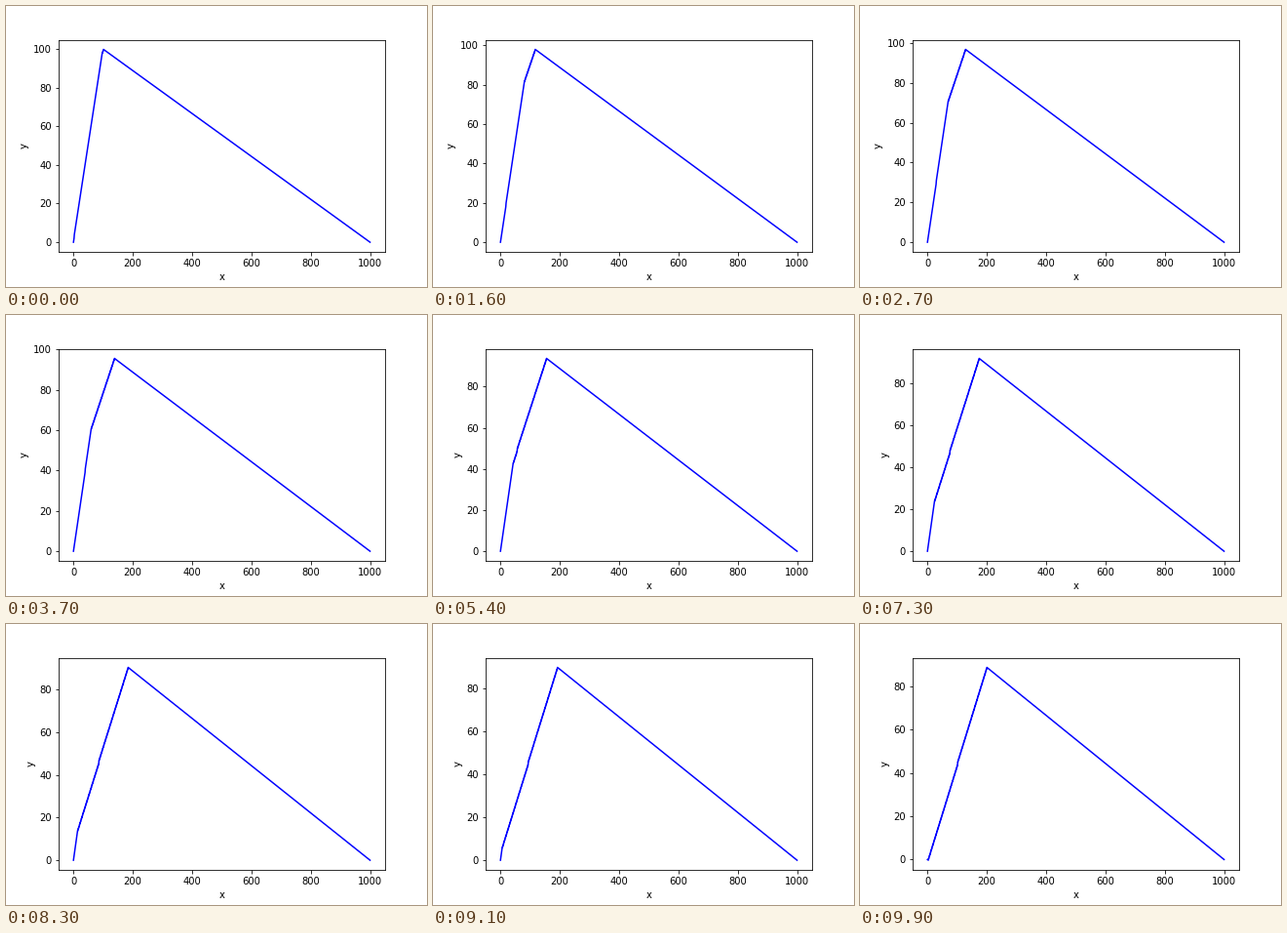
These frames come from a looping animation (432x288 px, 10 s). A matplotlib script:

```python
import numpy as np
import matplotlib.pyplot as plt
from matplotlib.animation import FuncAnimation

FRAMES = 100
POINTS = 1000
PEAK = 100


def pluck():
    """Triangular starting shape with both ends held at zero."""
    s = np.arange(1, POINTS + 1)
    y = np.where(s <= PEAK, s, PEAK * (POINTS - s) / (POINTS - PEAK)).astype(float)
    y[0] = y[-1] = 0
    return y


def step(prev, now):
    """One leapfrog step of the wave equation at Courant number 1."""
    new = np.zeros_like(now)
    new[1:-1] = now[2:] + now[:-2] - prev[1:-1]
    return now, new


def simulate():
    prev, now = pluck(), pluck()
    prev, now = step(prev, now)
    shapes = []
    for _ in range(FRAMES):
        prev, now = step(prev, now)
        shapes.append(now)
    return shapes


shapes = simulate()

fig, ax = plt.subplots(figsize=(6, 4), dpi=72)
fig.subplots_adjust(left=0.125, right=0.9, bottom=0.125, top=0.88)
ax.set_xlabel("x")
ax.set_ylabel("y")
line, = ax.plot(np.arange(POINTS), shapes[0], color="blue", lw=1.5)


def update(i):
    line.set_ydata(shapes[i])
    ax.relim()
    ax.autoscale_view()
    return line,


anim = FuncAnimation(fig, update, frames=FRAMES, interval=100,
                     repeat=True, repeat_delay=0, blit=False)
plt.show()
```
